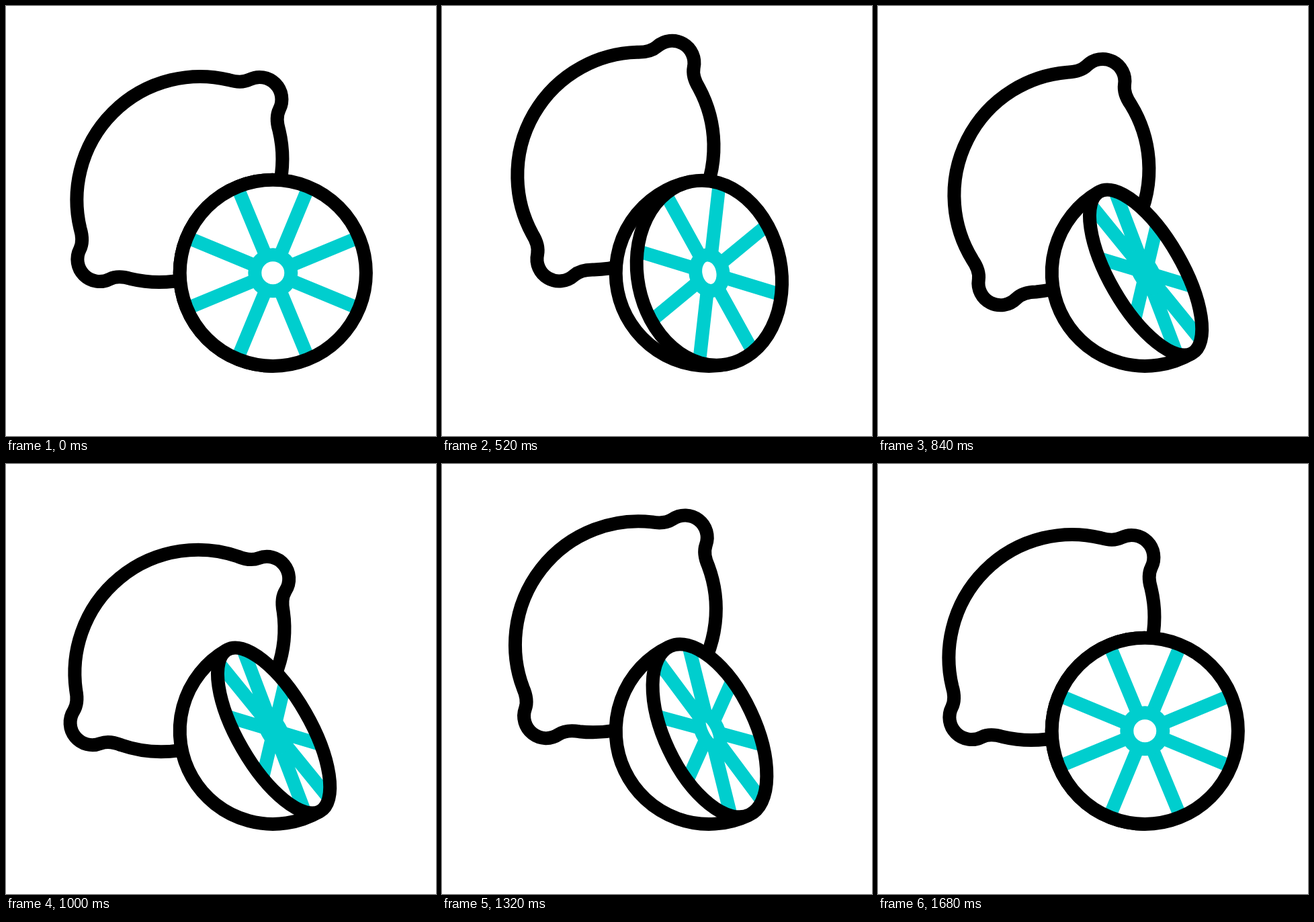
Write an HTML page with a canvas that moves like this. It is 640 by 640 pixels and loops after 2 s.

```html
<!DOCTYPE html>
<html lang="en">
<head>
<meta charset="utf-8">
<title>Lemon and slice</title>
<style>
  html, body { margin: 0; width: 100%; height: 100%; overflow: hidden; background: #fff; }
  canvas { display: block; }
</style>
</head>
<body>
<canvas id="stage" width="640" height="640"></canvas>
<script>
const ctx = document.getElementById('stage').getContext('2d');
const LOOP = 2000, STEP = 40;
const INK = '#000', CYAN = '#00cece';
const RADIUS = 138.6, HUB = 27;

const lemon = new Path2D(`M-148 73A183.5 183.5 0 0 1 73-148
  C83-145 94-143.5 104-148.4A33 33 0 0 1 148.4-104C143.5-94 145-83 148-73
  A183.5 183.5 0 0 1-73 148C-83 145-94 143.5-104 148.4
  A33 33 0 0 1-148.4 104C-143.5 94-145 83-148 73Z`);

// Keys are [time, value] pairs, eased in and out between neighbours
const LIFT = [[270, 0], [730, -48.5], [890, 20], [1120, 20], [1400, -24.5], [1600, 0]];
const TILT = [[270, 0], [640, -20], [800, -20], [1065, 10], [1400, -10], [1600, 0]];
const TURN = [[320, 0], [800, 1], [1200, 1], [1680, 0]];

function valueAt(keys, t) {
  const next = keys.findIndex(([time]) => time > t);
  if (next < 1) return keys[0][1];
  const [t0, a] = keys[next - 1], [t1, b] = keys[next];
  const u = (t - t0) / (t1 - t0);
  return a + (b - a) * u * u * (3 - 2 * u);
}

const radians = deg => deg * Math.PI / 180;

function drawLemon(t) {
  ctx.save();
  ctx.translate(258.4, 258 + valueAt(LIFT, t));
  ctx.rotate(radians(valueAt(TILT, t)));
  ctx.stroke(lemon);
  ctx.restore();
}

function drawSlice(turn) {
  ctx.save();
  ctx.translate(397.3, 397.3);
  ctx.rotate(radians(-30 * turn));
  const squeeze = 1 - 0.61 * turn;

  const ring = (r, rx = r * squeeze) => {
    ctx.beginPath();
    ctx.ellipse(0, 0, rx, r, 0, 0, 2 * Math.PI);
  };
  const stroke = color => {
    ctx.strokeStyle = color;
    ctx.stroke();
  };

  // Rind behind the cut
  ctx.beginPath();
  ctx.arc(0, 0, RADIUS, Math.PI / 2, Math.PI * 1.5);
  ctx.fill();
  stroke(INK);

  // Cut face, with a hub whose hole closes as it turns
  ctx.translate(1.5 * turn, 0);
  ring(RADIUS);
  ctx.fill();
  ctx.beginPath();
  for (let i = 0; i < 8; i++) {
    const angle = radians(22.5 + 45 * i);
    const x = Math.cos(angle) * squeeze, y = Math.sin(angle);
    ctx.moveTo(x * HUB, y * HUB);
    ctx.lineTo(x * RADIUS, y * RADIUS);
  }
  stroke(CYAN);
  ring(HUB, HUB * (1 - 0.65 * turn));
  stroke(CYAN);
  ring(RADIUS);
  stroke(INK);
  ctx.restore();
}

function draw() {
  const t = Math.floor(performance.now() % LOOP / STEP) * STEP;
  ctx.fillStyle = '#fff';
  ctx.fillRect(0, 0, 640, 640);
  ctx.lineWidth = 20;
  ctx.strokeStyle = INK;
  drawLemon(t);
  drawSlice(valueAt(TURN, t));
  requestAnimationFrame(draw);
}
draw();
</script>
</body>
</html>
```
